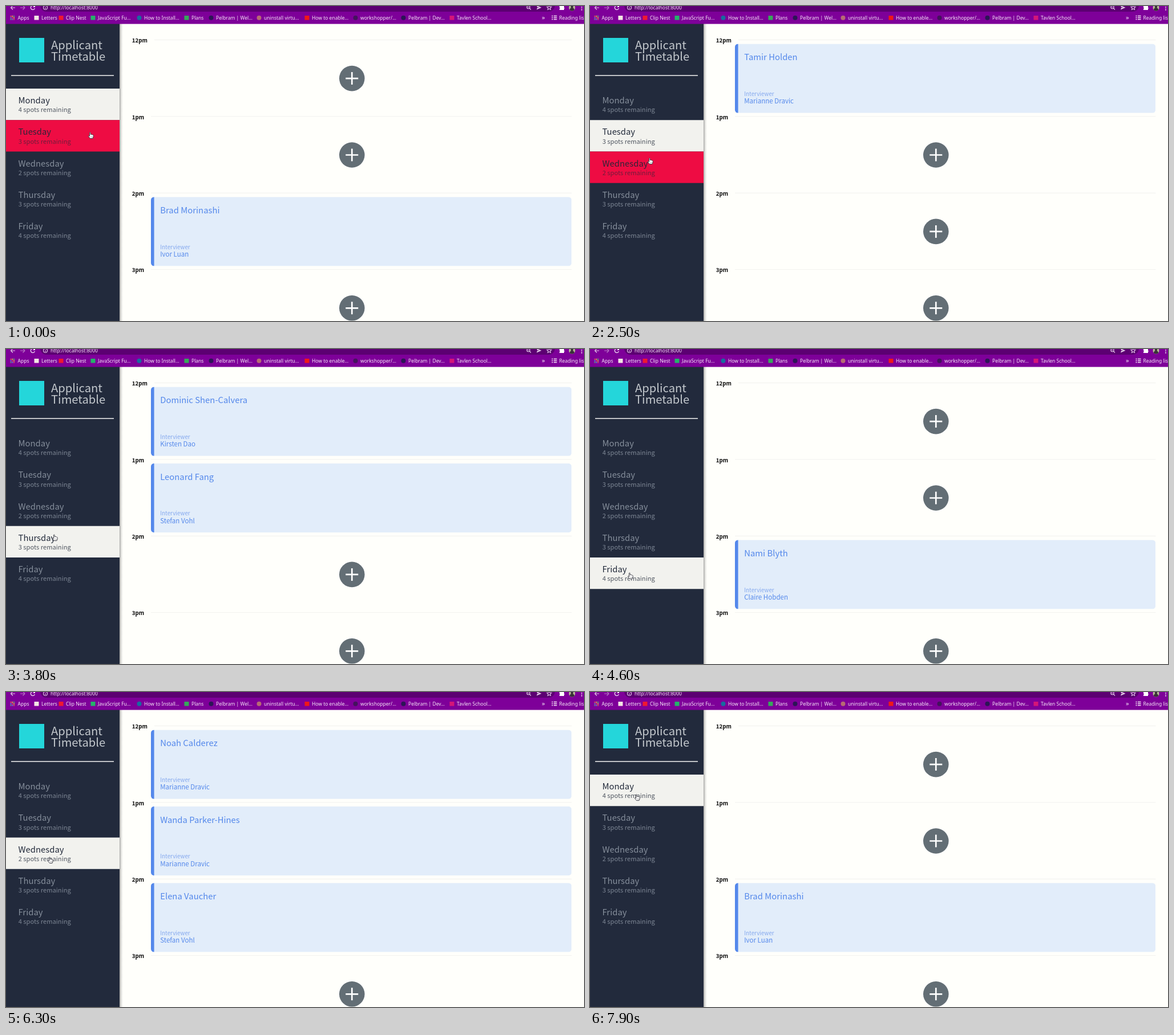
Animation, 1013 px wide and 553 px high, one loop 8000 ms. Source, as an HTML page:

```html
<!DOCTYPE html>
<html lang="en">
<head>
<meta charset="utf-8">
<title>Appointment planner</title>
<style>
  html, body { margin: 0; width: 100%; height: 100%; overflow: hidden; background: #fffffb; }
  svg { display: block; width: 100vw; height: 100vh; }
  text { font-family: "Noto Sans CJK JP", "Noto Sans CJK SC", "Noto Sans CJK", sans-serif; white-space: pre; }
  .chrome text { font-family: "Noto Sans", "Open Sans", sans-serif; font-size: 8.5px; fill: #f6ebf8; }
  .title { font-size: 20.2px; font-weight: 300; fill: #c3c8cd; }
  .hour { font-size: 9.75px; font-weight: 700; fill: #0c0c0c; }
  .day { font-size: 14.85px; fill: #858e9b; }
  .spots { font-size: 11.15px; font-weight: 300; fill: #7c8593; }
  .selected .day { fill: #222a3a; }
  .selected .spots { fill: #525862; }
  .hovered .day { fill: #2f2438; }
  .hovered .spots { fill: #701d3c; }
  .name { font-size: 14.85px; fill: #5488eb; }
  .label { font-size: 9.85px; font-weight: 300; fill: #85a9ee; }
  .person { font-size: 11.55px; fill: #5488eb; }
</style>
</head>
<body>
<svg viewBox="0 0 1013 553" preserveAspectRatio="none">
  <defs>
    <linearGradient id="shade">
      <stop offset="0" stop-color="#000" stop-opacity=".34"/>
      <stop offset=".5" stop-color="#000" stop-opacity=".1"/>
      <stop offset="1" stop-color="#000" stop-opacity="0"/>
    </linearGradient>
    <clipPath id="cardShape"><rect width="737.2" height="121.4" rx="5.5"/></clipPath>
    <g id="card" clip-path="url(#cardShape)">
      <rect width="737.2" height="121.4" fill="#e2edfa"/>
      <rect width="5.6" height="121.4" fill="#5488eb"/>
    </g>
    <g id="add">
      <circle r="22.3" fill="#636e75"/>
      <path d="M-11 0H11M0-11V11" stroke="#fff" stroke-width="2.7"/>
    </g>
  </defs>

  <rect width="1013" height="553" fill="#fffffb"/>
  <g id="schedule"></g>
  <rect x="199" y="31" width="6" height="522" fill="url(#shade)"/>
  <rect y="31" width="199" height="522" fill="#222a3c"/>
  <rect x="23" y="56" width="44" height="43" fill="#24d6da"/>
  <text class="title" x="79" y="76">Applicant</text>
  <text class="title" x="79" y="96">Timetable</text>
  <path d="M9 122H189" stroke="#f4f5f5" stroke-width="1.4"/>
  <g id="days"></g>

  <g class="chrome">
    <rect width="1013" height="31.5" fill="#7e0099"/>
    <rect x="60" y="-14" width="902" height="24" rx="11" fill="#5c0072"/>
    <g fill="none" stroke="#e3cbe8" stroke-width="1.1">
      <path d="M16 3H8.500M12-1L8.500 3L12 6.500"/>
      <path d="M25 3H33M29.500-1L33 3L29.500 6.500" opacity=".6"/>
      <path d="M50 1A3.600 3.600 0 1 0 50.400 4M50.400-1V1.500H47.500" stroke="#fff"/>
      <circle cx="69" cy="2.800" r="3.500"/>
      <path d="M69 2.500V5M69 .700V1.500"/>
      <circle cx="915.500" cy="2" r="2.700"/>
      <path d="M917.500 4L920 6.500M914.200 2H916.800"/>
      <path d="M952-1.500L953.200 1.200L956 1.500L953.900 3.400L954.500 6.300L952 4.800L949.500 6.300L950.100 3.400L948 1.500L950.800 1.200Z"/>
    </g>
    <path d="M930-1L938.500 2.700L930 6.500L931 3.300L935 2.700L931 2Z" fill="#e3cbe8"/>
    <path d="M970 0H973A1.400 1.400 0 0 1 975.500 0H978V2.500A1.400 1.400 0 0 1 978 5V7H970V5A1.400 1.400 0 0 0 970 2.500Z" fill="#fff"/>
    <circle cx="992" cy="3" r="5.500" fill="#b9bd98"/>
    <path d="M988 7Q988 3 992 3Q996 3 996 7Q992 10 988 7Z" fill="#383038"/>
    <circle cx="992" cy="1.300" r="2.200" fill="#383038"/>
    <path d="M1009-1V8" stroke="#fff" stroke-width="1.700" stroke-dasharray="1.700 1.700"/>
    <text x="78" y="5.500">http://localhost:8000</text>
    <g id="bookmarks"></g>
    <text x="939" y="24" style="font-size:11px">»</text>
    <path d="M960 17.500H965.500M960 20.500H965.500M960 23.500H965.500M956.500 17.500H958.500M956.500 20.500H958.500M956.500 23.500H958.500" stroke="#f6ebf8" stroke-width="1.400"/>
    <text x="969.500" y="24">Reading list</text>
  </g>

  <g id="cursor">
    <path d="M-2.500-4.500Q-1.700-6-.9-4.500L-.7-1.500Q.4-2.300 1-1.300Q2.100-1.900 2.600-.8Q4.200-1.100 4.300.5L4 3L3 5.500H-1.500L-4.500 1.700Q-4.600.3-3.200.8L-2.300 1.700Z"
      fill="#fff" stroke="#30323a" stroke-width=".9" stroke-linejoin="round"/>
    <path d="M-.2 2V4M1.200 2V4M2.600 2V4" stroke="#777" stroke-width=".5"/>
  </g>
</svg>

<script>
const LOOP = 8000, STEP = 100, ROW = 134.4, ITEM = 55.25;
const $ = id => document.getElementById(id);
const text = (cls, x, y, s) => `<text class="${cls}" x="${x}" y="${y}">${s}</text>`;

const days = [["Monday", 4], ["Tuesday", 3], ["Wednesday", 2], ["Thursday", 3], ["Friday", 4]];
const hours = ["12pm", "1pm", "2pm", "3pm"];

// Per day: hour row -> [candidate, interviewer]
const bookings = [
  { 2: ["Brad Morinashi", "Ivor Luan"] },
  { 0: ["Tamir Holden", "Marianne Dravic"] },
  { 0: ["Noah Calderez", "Marianne Dravic"], 1: ["Wanda Parker-Hines", "Marianne Dravic"], 2: ["Elena Vaucher", "Stefan Vohl"] },
  { 0: ["Dominic Shen-Calvera", "Kirsten Dao"], 1: ["Leonard Fang", "Stefan Vohl"] },
  { 2: ["Nami Blyth", "Claire Hobden"] }
];

// [time, day index]
const selections = [[0, 0], [1800, 1], [2900, 2], [3800, 3], [4500, 4], [5600, 3], [6300, 2], [7200, 1], [7900, 0]];
const hovers = [[0, 1], [2400, 2], [3300, 3], [4300, 4], [5200, 3], [6000, 2], [6900, 1], [7500, 0]];

// [first step, last step, x, y]
const moves = [
  [0, 0, 149, 227], [500, 500, 148.5, 227], [1100, 1400, 125, 231], [2100, 2500, 106, 272],
  [2900, 3000, 104, 276], [3200, 3300, 87, 330], [3500, 3500, 86, 331], [3900, 4100, 78, 352],
  [4300, 4300, 72, 391], [4500, 4600, 71, 398], [4900, 4900, 71.5, 399], [5200, 5200, 77, 380],
  [5400, 5400, 78, 354], [5700, 6100, 78, 295], [6500, 7100, 78, 242], [7300, 7300, 78, 222],
  [7400, 7700, 83, 185]
];

// [text x, label, icon colour, round icon]
const bookmarks = [
  [62, "Letters", "#f3e6e4"], [105, "Clip Nest", "#f01830"], [161, "JavaScript Fu…", "#25b36a"],
  [242, "How to Install…", "#176c9f", true], [325, "Plans", "#37a85a"], [368, "Pelbram | Wel…", "#2b1555", true],
  [452, "uninstall virtu…", "#b66b73", true], [536, "How to enable…", "#f01818"],
  [621, "workshopper/…", "#43135c", true], [705, "Pelbram | Dev…", "#2b1555", true], [790, "Tavlen School…", "#d51678"]
];

function bookmark([x, label, color, round]) {
  const icon = round
    ? `<circle cx="${x - 8.5}" cy="20.8" r="4" fill="${color}"/>`
    : `<rect x="${x - 12.5}" y="17" width="8" height="7.5" fill="${color}"/>`;
  return icon + text("", x, 24, label);
}

function appsIcon() {
  const colors = ["#f05a50", "#f2bd42", "#52b87b", "#5b8def"];
  return Array.from({ length: 9 }, (_, i) =>
    `<rect x="${7.5 + i % 3 * 2.8}" y="${17 + Math.floor(i / 3) * 2.8}" width="1.9" height="1.9" fill="${colors[i % 4]}"/>`).join("");
}

function hourRow(hour, row, booking) {
  const y = row * ROW;
  const line = `<path d="M${row ? 254 : 260} ${59.5 + y}H991.5" stroke="#f1f1ee"/>`;
  const content = booking
    ? `<use href="#card" x="254" y="${66.4 + y}"/>` +
      text("name", 270.2, 95.1 + y, booking[0]) +
      text("label", 270.2, 157.7 + y, "Interviewer") +
      text("person", 270.2, 171.3 + y, booking[1])
    : `<use href="#add" x="606.3" y="${127.1 + y}"/>`;
  return line + text("hour", 220.8, 64.2 + y, hour) + content;
}

function dayItem([day, spots], i, selected, hovered) {
  const y = 145 + i * ITEM;
  const state = i === selected ? "selected" : i === hovered ? "hovered" : "";
  const fill = { selected: "#f2f2ee", hovered: "#ee0c43" }[state] || "none";
  return `<g class="${state}"><rect y="${y}" width="199" height="${ITEM}" fill="${fill}"/>` +
    text("day", 21.5, y + 26, day) + text("spots", 21.7, y + 41.3, `${spots} spots remaining`) + "</g>";
}

const current = (list, t) => list.filter(([start]) => start <= t).pop()[1];

function cursorAt(t) {
  let [, , x, y] = moves[0];
  for (const [first, last, toX, toY] of moves) {
    if (t < first) break;
    const part = Math.min(1, (t - first + STEP) / (last - first + STEP));
    x += (toX - x) * part;
    y += (toY - y) * part;
  }
  return [x, y];
}

let shown = "";
function draw() {
  const t = Math.floor(performance.now() % LOOP / STEP) * STEP;
  const selected = current(selections, t), hovered = current(hovers, t);
  const state = `${selected}/${hovered}`;
  if (state !== shown) {
    $("schedule").innerHTML = hours.map((h, row) => hourRow(h, row, bookings[selected][row])).join("");
    $("days").innerHTML = days.map((d, i) => dayItem(d, i, selected, hovered)).join("");
    shown = state;
  }
  $("cursor").setAttribute("transform", `translate(${cursorAt(t)})`);
  requestAnimationFrame(draw);
}

$("bookmarks").innerHTML = appsIcon() + text("", 20.5, 24, "Apps") + bookmarks.map(bookmark).join("");
draw();
</script>
</body>
</html>
```
